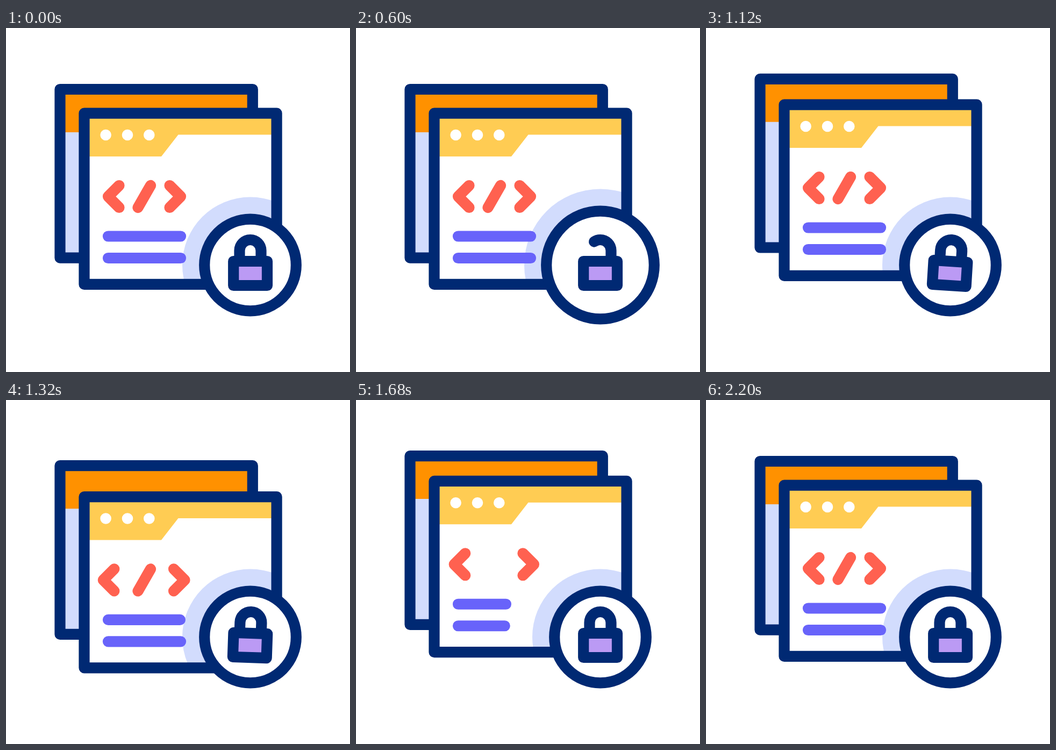
An HTML page for the animation above (2.48 s loop, 640 px wide and 640 px high).

```html
<!DOCTYPE html>
<html lang="en">
<head>
<meta charset="utf-8">
<title>Locked code window</title>
<style>
  html, body { margin: 0; width: 100%; height: 100%; overflow: hidden; background: #fff; }
  svg { display: block; width: 100%; height: 100%; }
  .navy { stroke: #002973; }
  .red { stroke: #ff6150; }
  .indigo { stroke: #6863fa; }
</style>
</head>
<body>
<svg viewBox="0 0 640 640" fill="none" stroke-width="20.2" stroke-linecap="round" stroke-linejoin="round">
  <clipPath id="pane"><rect id="paneRect" x="155" y="168" width="339" height="300"/></clipPath>

  <g id="back">
    <path fill="#d2dcfd" d="M100.5 114H458.8V427.7H100.5z"/>
    <path fill="#ff9100" d="M100.5 114H458.8V194H100.5z"/>
    <path class="navy" d="M100.5 114H458.8V427.7H100.5z"/>
  </g>

  <g id="front">
    <path fill="#fff" d="M145.5 158.6H503.6V476.9H145.5z"/>
    <path fill="#ffcc53" d="M150 163H499V198.5H320.5L289 239H150z"/>
    <path stroke="#fff" stroke-width="20.6" d="M185.6 199h0M226 199h0M266.3 199h0"/>
  </g>
  <circle id="halo" cx="454.5" cy="441" fill="#d2dcfd" clip-path="url(#pane)"/>
  <g id="content">
    <g class="red">
      <path id="left" d="M210.5 293L190 313.5L210.5 334"/>
      <path id="slash" pathLength="1" d="M245.5 334L269 293"/>
      <path id="right" d="M304.5 293L325 313.5L304.5 334"/>
    </g>
    <path id="line1" class="indigo"/>
    <path id="line2" class="indigo"/>
    <path class="navy" d="M145.5 158.6H503.6V476.9H145.5z"/>
  </g>

  <circle id="badge" class="navy" cx="454.5" cy="441" fill="#fff"/>
  <g id="lock" class="navy">
    <path id="shackle" d="M474.5 434V414a20 20 0 0 0-40 0V434"/>
    <path fill="#bb9af4" d="M423.2 434H486V479H423.2z"/>
  </g>
</svg>
<script>
const LOOP = 2480, STEP = 40;
const $ = id => document.getElementById(id);
const set = (id, name, value) => $(id).setAttribute(name, value);
const move = (id, x, y) => set(id, 'transform', `translate(${x} ${y})`);

// Sine easing from 0 at time a to 1 at time b.
const ease = (t, a, b) => (1 - Math.cos(Math.PI * Math.min(1, Math.max(0, (t - a) / (b - a))))) / 2;

// Rises from a to b, holds, and falls from c to d.
const bump = (t, a, b, c, d) => ease(t, a, b) - ease(t, c, d);

// Eases through evenly spaced peaks, from rest and back to rest.
function bob(t, start, beat, ...peaks) {
  let y = 0, last = 0;
  [...peaks, 0].forEach((peak, i) => {
    y += (peak - last) * ease(t, start + i * beat, start + (i + 1) * beat);
    last = peak;
  });
  return y;
}

// Fading shake that begins at full strength.
function shake(t, start, length, beat, size) {
  const u = (t - start) / length;
  return u < 0 || u > 1 ? 0 : size * (1 - u) * Math.sin(Math.PI * (t - start) / beat);
}

const lineLength = (t, low) => 135 - 52 * bump(t, low - 320, low, low, low + 320);

function draw(t) {
  const grow = bump(t, 0, 520, 520, 880);
  set('badge', 'r', 85.3 + 17 * grow);
  set('halo', 'r', 126.5 + 17 * grow);
  set('shackle', 'stroke-dasharray', `${103 - 45 * grow} 200`);
  set('lock', 'transform', `rotate(${shake(t, 870, 700, 100, 5.5)} 454.5 441)`);

  const y = bob(t, 790, 275, -20, 22, -10, 7);
  for (const id of ['front', 'content', 'paneRect']) move(id, 0, y);
  move('back', 0, bob(t, 895, 258, -20, 19, -10, 7));

  const gap = bump(t, 1120, 1380, 1560, 1880);
  move('left', -10.5 * gap, 0);
  move('right', 8.6 * gap, 0);

  const ink = 1 - bump(t, 1360, 1600, 1680, 1900);
  set('slash', 'stroke-dasharray', `${ink} 2`);
  set('slash', 'visibility', ink > 0.001 ? 'visible' : 'hidden');
  set('line1', 'd', `M190 387.5h${lineLength(t, 1610)}`);
  set('line2', 'd', `M190 428h${lineLength(t, 1735)}`);
}

const start = performance.now();
function tick() {
  const t = (performance.now() - start) % LOOP;
  draw(Math.floor(t / STEP) * STEP);
  requestAnimationFrame(tick);
}
tick();
</script>
</body>
</html>
```
